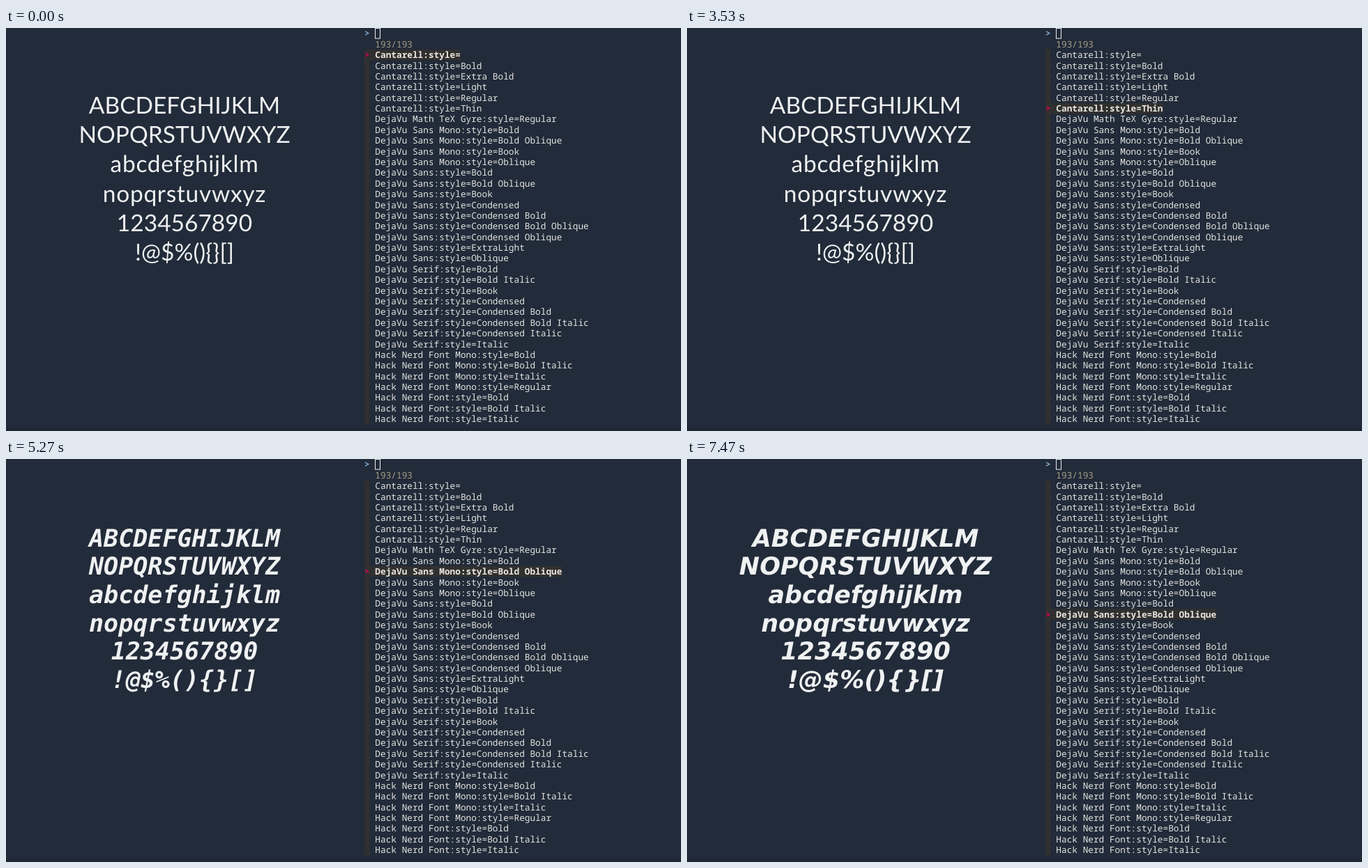
Recreate the animation shown at these times as an HTML page. Size 968 by 579 pixels, loop 8140 ms.

```html
<!DOCTYPE html>
<html lang="en">
<head>
<meta charset="utf-8">
<title>Font preview</title>
<style>
  html, body { margin: 0; width: 100%; height: 100%; overflow: hidden; background: #222b39; }
  svg { display: block; width: 968px; height: 579px; text-rendering: geometricPrecision; }
  text { white-space: pre; }
  #terminal { font: 12.775px "Noto Sans Mono", monospace; fill: #e2e4e2; }
  #terminal .selected { font-weight: bold; fill: #ebe7df; }
  #terminal .pointer { font-weight: bold; fill: #d7005f; }
  #preview { fill: #eff1f2; text-anchor: middle; }
</style>
</head>
<body>
<svg viewBox="0 0 968 579">
  <rect y="574.5" width="968" height="4.5" fill="#1f2734"/>
  <g id="preview"></g>
  <g id="terminal"></g>
</svg>
<script>
const LOOP = 8140, LEFT = 514, CELL = 7.665, ROW = 15.385;

const styles = {
  "Cantarell": ["", "Bold", "Extra Bold", "Light", "Regular", "Thin"],
  "DejaVu Math TeX Gyre": ["Regular"],
  "DejaVu Sans Mono": ["Bold", "Bold Oblique", "Book", "Oblique"],
  "DejaVu Sans": ["Bold", "Bold Oblique", "Book", "Condensed", "Condensed Bold",
    "Condensed Bold Oblique", "Condensed Oblique", "ExtraLight", "Oblique"],
  "DejaVu Serif": ["Bold", "Bold Italic", "Book", "Condensed", "Condensed Bold",
    "Condensed Bold Italic", "Condensed Italic", "Italic"],
  "Hack Nerd Font Mono": ["Bold", "Bold Italic", "Italic", "Regular"],
  "Hack Nerd Font": ["Bold", "Bold Italic", "Italic"]
};
const entries = Object.entries(styles).flatMap(([family, list]) =>
  list.map(style => ({ family, style, label: `${family}:style=${style}` })));

const faces = {
  "Cantarell": { font: "Lato, sans-serif", size: 33.5, top: 123, pitch: 42.2, lowerSpacing: 0.7 },
  "DejaVu Math TeX Gyre": { font: "'DejaVu Serif', serif", size: 35, top: 136.5, pitch: 35.6 },
  "DejaVu Sans Mono": { font: "'DejaVu Sans Mono', monospace", size: 35, top: 125.5, pitch: 40.74 },
  "DejaVu Sans": { font: "'DejaVu Sans', sans-serif", size: 35, top: 125.5, pitch: 40.74 }
};
const weights = { "Extra Bold": 900, "Bold": 700, "Bold Oblique": 700, "Light": 300, "Thin": 100 };
const sample = ["ABCDEFGHIJKLM", "NOPQRSTUVWXYZ", "abcdefghijklm",
  "nopqrstuvwxyz", "1234567890", "!@$%(){}[]"];

// [time, entry]: the preview follows the selection with a delay
const selections = [[0, 0], [1130, 1], [2530, 3], [2870, 4], [3530, 5], [4070, 6], [4600, 7],
  [5000, 8], [5600, 9], [6000, 10], [6530, 11], [7070, 12]];
const previews = [[0, 0], [1400, 1], [2530, 2], [2600, 3], [3130, 4], [3800, 5], [4270, 6],
  [4870, 7], [5270, 8], [5870, 9], [6270, 10], [6930, 11], [7470, 12]];

function add(parent, tag, attributes, content = "") {
  const node = document.createElementNS("http://www.w3.org/2000/svg", tag);
  for (const name in attributes) node.setAttribute(name, attributes[name]);
  node.textContent = content;
  return parent.appendChild(node);
}

const terminal = document.getElementById("terminal");
const preview = document.getElementById("preview");
const write = (column, row, content, attributes = {}) =>
  add(terminal, "text", { x: LEFT + column * CELL, y: row * ROW + 12.4, ...attributes }, content);

add(terminal, "rect", { x: LEFT, y: 2 * ROW, width: CELL, height: entries.length * ROW, fill: "#303030" });
const highlight = add(terminal, "rect", { x: LEFT, height: ROW, fill: "#303030" });
write(0, 0, ">", { fill: "#87afd7", "font-weight": "bold" });
add(terminal, "rect", { x: 529.5, y: 0.5, width: 7, height: 14.5, fill: "none", stroke: "#eff1f2" });
write(2, 1, "193/193", { fill: "#a89f8a" });
const rows = entries.map((entry, i) => write(2, i + 2, entry.label));
const pointer = write(0, 2, ">", { class: "pointer" });
const lines = sample.map(line => add(preview, "text", { x: 256 }, line));

function select(index) {
  rows.forEach((row, i) => row.classList.toggle("selected", i === index));
  highlight.setAttribute("y", (index + 2) * ROW);
  highlight.setAttribute("width", (entries[index].label.length + 2) * CELL);
  pointer.setAttribute("y", (index + 2) * ROW + 12.4);
}

function showPreview(index) {
  const { family, style } = entries[index];
  const face = faces[family];
  const slant = style.includes("Oblique") ? "oblique" : "normal";
  preview.style.font = `${slant} ${weights[style] || 400} ${face.size}px ${face.font}`;
  lines.forEach((line, i) => {
    line.setAttribute("y", face.top + i * face.pitch);
    line.style.letterSpacing = /[a-z]/.test(sample[i]) ? `${face.lowerSpacing || 0}px` : "0";
  });
}

const valueAt = (steps, time) => steps.findLast(([start]) => start <= time)[1];
let selected = -1, shown = -1;

function draw() {
  const time = performance.now() % LOOP;
  const nextSelected = valueAt(selections, time), nextShown = valueAt(previews, time);
  if (nextSelected !== selected) select(selected = nextSelected);
  if (nextShown !== shown) showPreview(shown = nextShown);
  requestAnimationFrame(draw);
}
draw();
</script>
</body>
</html>
```
